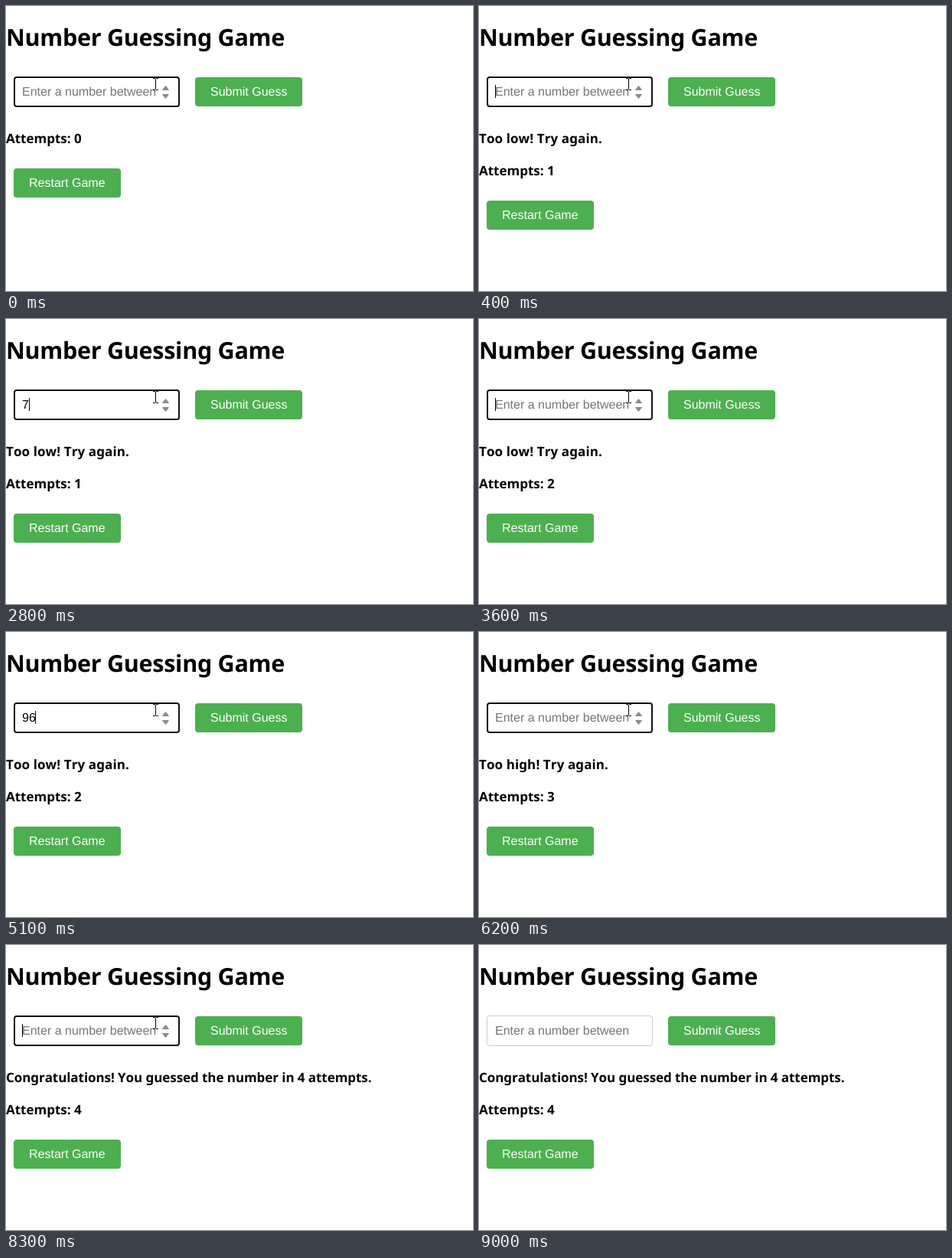
Animation of 610 by 372 pixels, one loop 9100 ms. Source, as an HTML page:

```html
<!DOCTYPE html>
<html lang="en">
<head>
<meta charset="utf-8">
<title>Number Guessing Game</title>
<style>
  html, body { margin: 0; width: 100%; height: 100%; overflow: hidden; background: #fff; }
  svg { display: block; width: 610px; height: 372px; }
  text { font: 16px "Liberation Sans", Arial, sans-serif; text-rendering: geometricPrecision; white-space: pre; }
  .heading { font: 700 17px "Noto Sans", "Open Sans", sans-serif; font-kerning: none; }
  #title { font-size: 30.5px; letter-spacing: -.27px; }
  .button rect { fill: #4caf50; }
  .button text { fill: #fff; }
</style>
</head>
<body>
<svg viewBox="0 0 610 372">
  <text id="title" class="heading" x="0" y="52">Number Guessing Game</text>

  <rect id="field" fill="#fff"/>
  <text id="value" x="21" y="117"></text>
  <rect id="caret" y="103" width="1" height="17"/>
  <g id="pointer">
    <path d="M208.5 104.5l4 5h-8zM208.5 120.5l4-5h-8z" fill="#8a8a8a" stroke="#8a8a8a" stroke-linejoin="round"/>
    <path d="M192 94.5h3M196 94.5h3M195.5 95v14M192 109.5h3M196 109.5h3" fill="none" stroke="#000"/>
  </g>

  <g class="button">
    <rect x="247" y="93" width="140" height="38" rx="4"/>
    <text x="267" y="117">Submit Guess</text>
  </g>

  <text id="message" class="heading" x="0" y="179"></text>
  <g id="lower">
    <text id="attempts" class="heading" x="0" y="179"></text>
    <g class="button">
      <rect x="10" y="212" width="140" height="38" rx="4"/>
      <text x="30" y="236">Restart Game</text>
    </g>
  </g>
</svg>
<script>
const LOOP = 9100, BLINK = 500, BLUR = 8700;
const PLACEHOLDER = "Enter a number between";
const LOW = "Too low! Try again.", HIGH = "Too high! Try again.";
const WIN = "Congratulations! You guessed the number in 4 attempts.";

// Each guess: first digit, second digit and submit times in ms.
const guesses = [
  { digits: "50", typed: [100, 200], submit: 400, reply: LOW },
  { digits: "75", typed: [2700, 2900], submit: 3400, reply: LOW },
  { digits: "96", typed: [4800, 5000], submit: 5500, reply: HIGH },
  { digits: "85", typed: [6500, 6700], submit: 7200, reply: WIN }
];

const el = id => document.getElementById(id);
const set = (id, attrs) => {
  for (const [name, v] of Object.entries(attrs)) el(id).setAttribute(name, v);
};
const show = (id, on) => set(id, { visibility: on ? "visible" : "hidden" });
const write = (id, text) => {
  if (el(id).textContent !== text) el(id).textContent = text;
};

function stateAt(t) {
  const state = { value: "", message: "", attempts: 0, lastEdit: -BLINK };
  for (const g of guesses) {
    g.typed.forEach((at, i) => {
      if (t >= at) {
        state.value = g.digits.slice(0, i + 1);
        state.lastEdit = at;
      }
    });
    if (t >= g.submit) {
      state.value = "";
      state.message = g.reply;
      state.attempts++;
      state.lastEdit = g.submit;
    }
  }
  return state;
}

function render(t) {
  const { value, message, attempts, lastEdit } = stateAt(t);
  const focused = t < BLUR;
  const caretOn = Math.floor((t - lastEdit) / BLINK) % 2 === 0;

  set("field", focused
    ? { x: 11, y: 93, width: 215, height: 38, rx: 3, stroke: "#101010", "stroke-width": 2 }
    : { x: 10.5, y: 92.5, width: 216, height: 39, rx: 3.5, stroke: "#ccc", "stroke-width": 1 });
  write("value", value || PLACEHOLDER);
  set("value", { fill: value ? "#000" : "#757575" });
  set("caret", { x: 21 + Math.round(value.length * 8.6) });
  show("caret", focused && caretOn);
  show("pointer", focused);

  write("message", message);
  set("message", { "letter-spacing": message === WIN ? -.07 : .1 });
  write("attempts", "Attempts: " + attempts);
  set("lower", { transform: `translate(0 ${message ? 42 : 0})` });
}

const start = performance.now();
function tick() {
  render((performance.now() - start) % LOOP);
  requestAnimationFrame(tick);
}
render(0);
requestAnimationFrame(tick);
</script>
</body>
</html>
```
